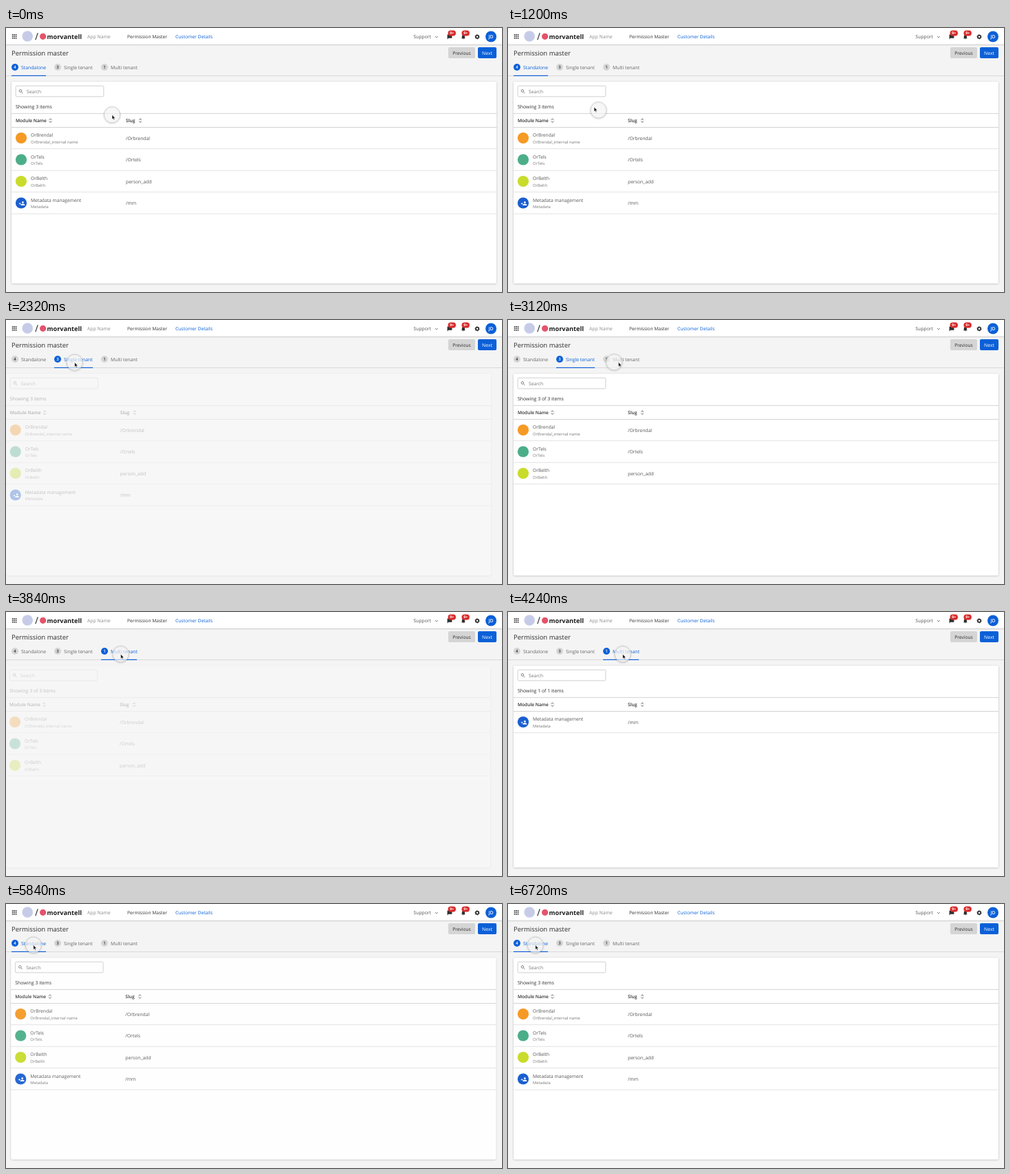
These frames come from a looping animation (720x384 px, 6800 ms). An HTML page:

```html
<!DOCTYPE html>
<html lang="en">
<head>
<meta charset="utf-8">
<title>Permission master</title>
<style>
  html, body { margin: 0; width: 100%; height: 100%; overflow: hidden; background: #f4f4f4; }
  svg { display: block; width: 720px; height: 384px; }
  text { font-family: "Open Sans", "Noto Sans", sans-serif; text-rendering: geometricPrecision; }
</style>
</head>
<body>
<svg id="stage" viewBox="0 0 720 384" xmlns="http://www.w3.org/2000/svg">
  <defs>
    <filter id="soft" x="-5%" y="-10%" width="110%" height="120%">
      <feDropShadow dx="0" dy="0.6" stdDeviation="1" flood-color="#000" flood-opacity="0.28"/>
    </filter>
    <filter id="halo" x="-30%" y="-30%" width="160%" height="160%">
      <feDropShadow dx="0" dy="0.5" stdDeviation="0.8" flood-color="#000" flood-opacity="0.3"/>
    </filter>
  </defs>
  <rect width="720" height="384" fill="#f4f4f4"/>
  <g id="cards"></g>
  <g id="top"></g>
  <g id="tabs"></g>
  <g id="ring" filter="url(#halo)">
    <circle r="11.6" fill="#fff" fill-opacity="0.6" stroke="#bdbdbd" stroke-width="0.7"/>
  </g>
  <path id="arrow" d="M0 0V6.6L1.5 5.3L2.5 7.5L3.6 7L2.6 4.9H4.6Z" fill="#111" stroke="#fff" stroke-width="0.5"/>
</svg>
<script>
const LOOP = 6800, STEP = 80, FADE = 320, SLIDE = 12, LAG = 55;
const BLUE = "#0b60d8", INK = "#2f2f2f", GREY = "#666";
const byId = id => document.getElementById(id);

const text = (x, y, str, size = 6.8, fill = INK, extra = "") =>
  `<text x="${x}" y="${y}" font-size="${size}" fill="${fill}" ${extra}>${str}</text>`;
const rect = (x, y, w, h, fill, extra = "") =>
  `<rect x="${x}" y="${y}" width="${w}" height="${h}" fill="${fill}" ${extra}/>`;
const circle = (x, y, r, fill, extra = "") =>
  `<circle cx="${x}" cy="${y}" r="${r}" fill="${fill}" ${extra}/>`;
const path = (d, fill, extra = "") => `<path d="${d}" fill="${fill}" ${extra}/>`;
const at = (x, y, body) => `<g transform="translate(${x} ${y})">${body}</g>`;
const MID = 'text-anchor="middle"', BOLD = 'font-weight="700"', SEMI = 'font-weight="600"';

function topBar() {
  let s = rect(0, 0, 720, 23.5, "#fff", 'filter="url(#soft)"');
  for (let i = 0; i < 9; i++) {
    s += rect(8.8 + (i % 3) * 2.5, 9 + Math.floor(i / 3) * 2.5, 1.6, 1.6, INK);
  }
  s += circle(31.2, 12, 7.8, "#c6cce8");
  s += path("M42.8 17.2L46.2 7.2", "none", `stroke="${INK}" stroke-width="1.1"`);
  s += circle(53.6, 12.3, 4.6, "#e5536b");
  s += text(59.6, 15.6, "morvantell", 9.15, "#1c1c1c", BOLD);
  s += text(118, 15, "App Name", 6.85, "#8c8c8c");
  s += text(176, 15, "Permission Master", 6.67);
  s += text(246, 15, "Customer Details", 6.73, BLUE);
  s += text(591.5, 15.4, "Support", 6.8, "#555");
  s += path("M623 12L625 14L627 12", "none", `stroke="${GREY}" stroke-width="0.8"`);
  s += path("M640.6 9.6H647.4V14.8H642.2L640.6 16.4Z", INK);
  s += path("M661 15.2L661.8 14.2V12A2.1 2.1 0 0 1 666 12V14.2L666.8 15.2ZM663.1 15.6H664.7L663.9 16.5Z", INK);
  for (const x of [647.3, 667.2]) {
    s += rect(x - 5.7, 3.6, 11.4, 7.8, "#d92c2c", 'rx="3.9"');
    s += text(x, 9.4, "9+", 5.2, "#fff", `${MID} ${BOLD}`);
  }
  s += circle(684, 12.8, 2.1, "none", `stroke="${INK}" stroke-width="1.7"`);
  s += circle(684, 12.8, 3.1, "none", `stroke="${INK}" stroke-width="0.9" stroke-dasharray="1.62"`);
  s += circle(704, 12.5, 8, BLUE);
  s += text(704, 15, "JD", 6.8, "#fff", `${MID} ${SEMI}`);

  s += text(8, 39.6, "Permission master", 9.5);
  s += rect(642, 28, 39, 16, "#d5d5d5", 'rx="2"') + text(661.5, 38.5, "Previous", 6.7, INK, MID);
  s += rect(685, 28, 27, 16, BLUE, 'rx="2"') + text(698.5, 38.5, "Next", 6.8, "#fff", MID);
  s += rect(0, 69.2, 720, 0.8, "#d2d2d2");
  return s;
}

const tabs = [
  { x: 8, w: 50, count: 4, label: "Standalone" },
  { x: 70, w: 56, count: 3, label: "Single tenant" },
  { x: 138, w: 52, count: 1, label: "Multi tenant" }
];
const tabMarkup = active => tabs.map(({ x, w, count, label }, i) => {
  const on = i === active;
  return circle(x + 5, 57, 5, on ? BLUE : "#d5d5d5")
    + text(x + 5, 59.2, count, 6, on ? "#fff" : INK, `${MID} ${SEMI}`)
    + text(x + 14, 59.5, label, 6.85, on ? BLUE : GREY)
    + (on ? rect(x, 68.8, w, 1.2, BLUE) : "");
}).join("");

const modules = [
  { name: "OrBrendal", note: "OrBrendal_internal name", slug: "/Orbrendal", color: "#f59a25" },
  { name: "OrTels", note: "OrTels", slug: "/Ortels", color: "#4cae88" },
  { name: "OrBelth", note: "OrBelth", slug: "person_add", color: "#c9dc2c" },
  { name: "Metadata management", note: "Metadata", slug: "/mm", color: "#1a5fd0", person: true }
];
const personAdd = circle(1.2, -1.4, 1.4, "#fff")
  + path("M-1.8 2.4C-1.8 0 4.2 0 4.2 2.4V3H-1.8ZM-3.4 -1.2H-2.6V-.2H-1.6V.6H-2.6V1.6H-3.4V.6H-4.4V-.2H-3.4Z", "#fff");

const sortIcon = x => path(`M${x - 1.7} 133.6L${x} 131.9L${x + 1.7} 133.6M${x - 1.7} 135.6L${x} 137.3L${x + 1.7} 135.6`,
  "none", `stroke="${INK}" stroke-width="0.8"`);

function row(m, i) {
  const y = 160 + i * 31.5;
  return circle(22, y, 8.1, m.color)
    + (m.person ? at(23.2, y + 0.6, personAdd) : "")
    + text(36, y - 1.8, m.name, 6.7, "#555")
    + text(36, y + 7.5, m.note, 5.8, "#777")
    + text(174, y + 2.5, m.slug, 6.8, "#555")
    + rect(8, y + 15.3, 704, 0.8, "#dcdcdc");
}

function card(summary, rows) {
  return "<g>" + rect(8, 78.2, 704, 293.3, "#fff", 'rx="2" filter="url(#soft)"')
    + rect(14.2, 84.2, 127.6, 15.6, "#fff", 'rx="1.5" stroke="#c4c4c4" stroke-width="0.8"')
    + circle(21, 91.4, 1.8, "none", `stroke="${GREY}" stroke-width="0.8"`)
    + path("M22.4 92.8L24.5 94.9", "none", `stroke="${GREY}" stroke-width="0.9"`)
    + text(30, 94.5, "Search", 6.7, "#777")
    + text(14, 116.6, summary, 6.95)
    + rect(8, 123.9, 704, 0.9, "#cfcfcf") + rect(8, 144, 704, 0.9, "#cfcfcf")
    + text(14, 137, "Module Name", 6.6, INK, SEMI) + sortIcon(64.5)
    + text(174, 137, "Slug", 6.6, INK, SEMI) + sortIcon(195)
    + rows.map(row).join("") + "</g>";
}

byId("top").innerHTML = topBar();
byId("cards").innerHTML = card("Showing 3 items", modules)
  + card("Showing 3 of 3 items", modules.slice(0, 3))
  + card("Showing 1 of 1 items", modules.slice(3));
const cards = [...byId("cards").children];

// Each switch fades the old card out to the left, then the next one back in.
const switches = [
  { time: 2100, page: 1 },
  { time: 3600, page: 2 },
  { time: 5220, page: 0, tabDelay: 240 }
];

// Pointer stops: time, x, y
const stops = [
  [0, 154, 126.3], [960, 154, 126.3], [1200, 125, 115], [1680, 99.7, 61.7], [1760, 99.7, 61.7],
  [2640, 99.7, 61.7], [3120, 160.3, 61.3], [3360, 166.5, 61.3], [3440, 166.5, 61.3],
  [4400, 166.5, 61.3], [4720, 100, 61], [4960, 39.8, 59.7], [5040, 39.8, 59.7], [LOOP, 39.8, 59.7]
];
const same = (a, b) => a[1] === b[1] && a[2] === b[2];

function slope(i, axis) {
  const before = stops[i - 1], here = stops[i], after = stops[i + 1];
  if (!before || !after || same(before, here) || same(here, after)) return 0;
  return (after[axis] - before[axis]) / (after[0] - before[0]);
}

function pointer(t) {
  t = Math.max(0, t);
  let i = 0;
  while (i < stops.length - 2 && t >= stops[i + 1][0]) i++;
  const a = stops[i], b = stops[i + 1], span = b[0] - a[0], u = (t - a[0]) / span;
  const ease = u * u * (3 - 2 * u);
  return [1, 2].map(k => a[k] + (b[k] - a[k]) * ease
    + span * u * (1 - u) * ((1 - u) * slope(i, k) - u * slope(i + 1, k)));
}

const place = (id, [x, y]) => byId(id).setAttribute("transform", `translate(${x} ${y})`);
let shownTab;

function render(t) {
  let page = 0, tab = 0, away = 0;
  for (const s of switches) {
    const age = t - s.time;
    if (age < 0) break;
    tab = age < (s.tabDelay || 0) ? -1 : s.page;
    if (age >= FADE) page = s.page;
    away = Math.max(0, 1 - Math.abs(age / FADE - 1));
  }
  cards.forEach((c, i) => {
    c.style.display = i === page ? "" : "none";
    c.setAttribute("opacity", 1 - away);
    c.setAttribute("transform", `translate(${-SLIDE * away} 0)`);
  });
  if (tab !== shownTab) byId("tabs").innerHTML = tabMarkup(shownTab = tab);
  place("ring", pointer(t - LAG));
  place("arrow", pointer(t));
}

const start = performance.now();
function tick() {
  const t = (performance.now() - start) % LOOP;
  render(Math.floor(t / STEP) * STEP);
  requestAnimationFrame(tick);
}
tick();
</script>
</body>
</html>
```
